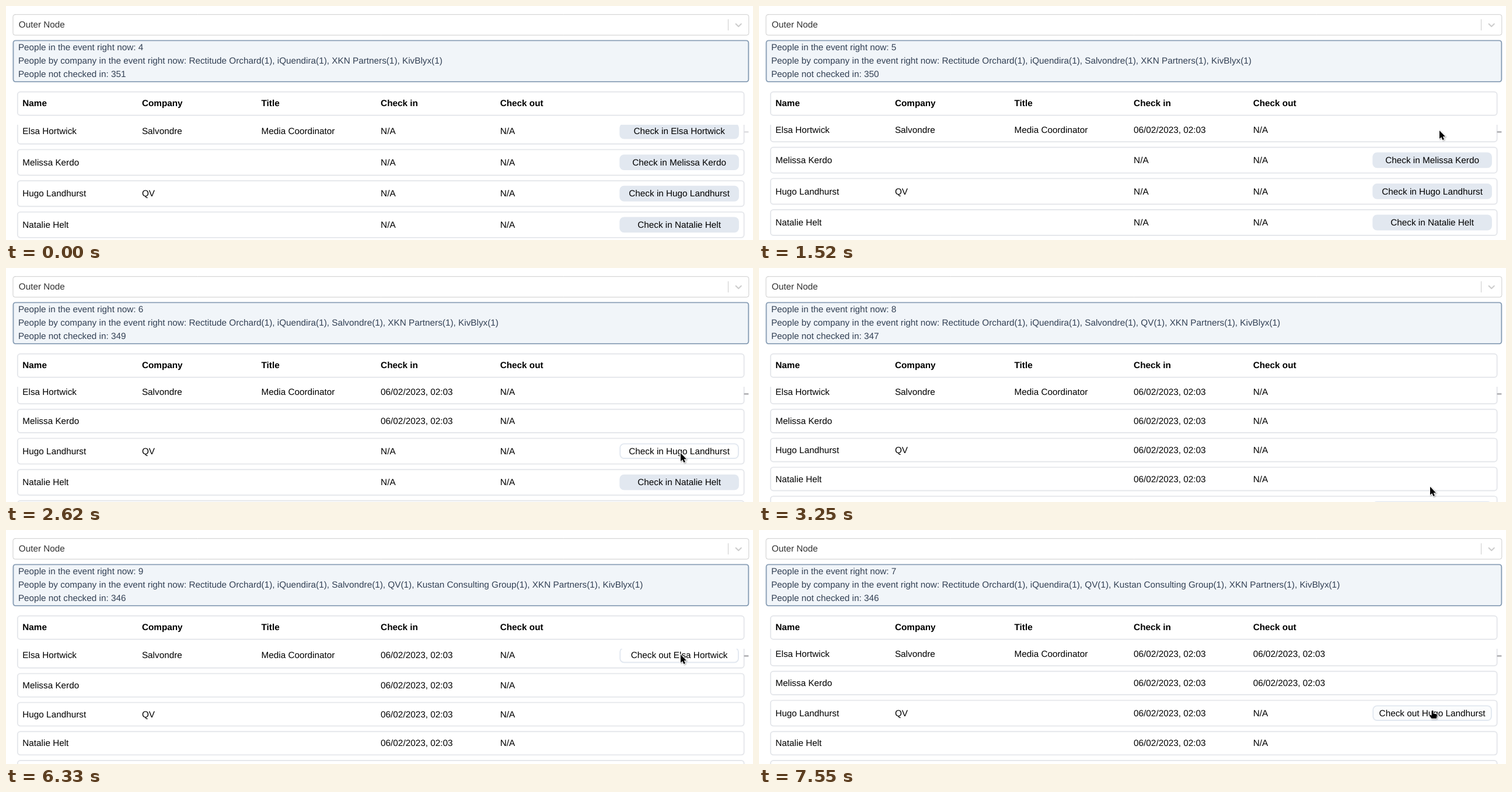
Write an HTML page with a canvas that moves like this. It is 1280 px wide and 402 px high and loops after 7650 ms.

```html
<!DOCTYPE html>
<html lang="en">
<head>
<meta charset="utf-8">
<title>Event check-in</title>
<style>
  html, body { margin: 0; width: 100%; height: 100%; overflow: hidden; background: #fff; }
  canvas { display: block; }
</style>
</head>
<body>
<canvas id="stage" width="1280" height="402"></canvas>
<script>
const ctx = document.getElementById('stage').getContext('2d');
const LOOP = 7650;
const S = 0.957;               // page zoom
const FACE = '"Liberation Sans", Arial, sans-serif';
const LEFT = 18.9, WIDTH = 1246.7, PAD = 9.4, COL = 204.6;
const LIST_TOP = 204, FIRST_ROW = 192.1;
const BTN_X = LEFT + PAD + 5 * COL, BTN_H = 28 * S;
const LAG = 160;               // ms between a click and its result
const MOVE = 300;              // ms for one pointer move
const NEVER = Infinity;

// enter: check-in, show: check-out button appears, leave: check-out (ms)
const people = [
  { name: 'Elsa Hortwick', company: 'Salvondre', title: 'Media Coordinator', enter: 1520, show: 5320, leave: 6480 },
  { name: 'Melissa Kerdo', company: '', title: '', enter: 2160, show: 6560, leave: 7240 },
  { name: 'Hugo Landhurst', company: 'QV', title: '', enter: 2650, show: 7290, leave: NEVER },
  { name: 'Natalie Helt', company: '', title: '', enter: 3200, show: NEVER, leave: NEVER },
  { name: 'Paula Venn', company: 'Kustan Consulting Group', title: '', enter: 3910, show: NEVER, leave: NEVER }
];

// the pointer sets off at a time towards a place and rests there
const trips = [
  { at: 330, x: 1150, y: 187 },
  { at: 520, x: 1175, y: 210 },
  { at: 900, x: 1168, y: 256 },
  { at: 1060, x: 1166, y: 214 },
  { at: people[0].enter, x: 1161, y: 270 },
  { at: people[1].enter, x: 1156, y: 318 },
  { at: people[2].enter, x: 1150, y: 373 },
  { at: people[3].enter, x: 1150, y: 410 },
  { at: 4250, x: 1143, y: 200 },
  { at: 5000, x: 1156, y: 214 },
  { at: people[0].leave, x: 1155, y: 268 },
  { at: people[1].leave, x: 1154, y: 310 }
];

const clamp = v => Math.max(0, Math.min(1, v));
const ease = k => k * k * (3 - 2 * k);
const mix = (a, b, k) => a + (b - a) * k;

function pointer(t) {
  if (t < trips[0].at) return null;
  let x = 1029, y = 359;
  trips.forEach((trip, i) => {
    const next = i + 1 < trips.length ? trips[i + 1].at : LOOP;
    const k = ease(clamp((t - trip.at) / Math.min(MOVE, next - trip.at)));
    x = mix(x, trip.x, k);
    y = mix(y, trip.y, k);
  });
  return { x, y };
}

function layout(t) {
  let y = FIRST_ROW;
  return people.map(p => {
    const label = t < p.enter ? 'Check in ' + p.name
      : t >= p.show && t < p.leave ? 'Check out ' + p.name : '';
    const h = (label ? 48 : 44) * S;
    const row = { p, label, y, h, mid: y + h / 2 };
    y += h + 8 * S;
    return row;
  });
}

function inList(t) {
  const c = pointer(t);
  return c !== null && c.y >= LIST_TOP;
}

function hovered(t) {
  if (!inList(t)) return -1;
  const c = pointer(t);
  if (c.x < BTN_X || c.x > BTN_X + COL) return -1;
  return layout(t).findIndex(r => r.label && Math.abs(c.y - r.mid) < BTN_H / 2);
}

// colour transition: share of the last 120 ms in which the test held
function share(t, test) {
  let n = 0;
  for (let k = 0; k < 8; k++) if (test(t - k * 15)) n++;
  return n / 8;
}

function text(str, x, mid, { color = '#000', bold = false, align = 'left' } = {}) {
  ctx.font = (bold ? 'bold ' : '') + 16 * S + 'px ' + FACE;
  ctx.fillStyle = color;
  ctx.textAlign = align;
  ctx.fillText(str, x, mid + 5.1);
}

// box with its border drawn inside the given edges
function box(x, y, w, h, r, line, stroke, fill) {
  ctx.beginPath();
  ctx.roundRect(x + line / 2, y + line / 2, w - line, h - line, r - line / 2);
  if (fill) { ctx.fillStyle = fill; ctx.fill(); }
  ctx.lineWidth = line;
  ctx.strokeStyle = stroke;
  ctx.stroke();
}

function drawSelect() {
  box(11.5, 14.2, 1261.8, 36.4, 4, 1, '#ccc', '#fff');
  text('Outer Node', 21.8, 32.2, { color: '#333' });
  ctx.fillStyle = '#ccc';
  ctx.fillRect(1237, 22.8, 1, 19.2);
  ctx.beginPath();
  ctx.moveTo(1250.6, 30.7);
  ctx.lineTo(1255.2, 35.2);
  ctx.lineTo(1259.8, 30.7);
  ctx.lineWidth = 2;
  ctx.lineCap = ctx.lineJoin = 'round';
  ctx.strokeStyle = '#ccc';
  ctx.stroke();
}

function drawSummary(t) {
  const inside = people.filter(p => t >= p.enter && t < p.leave);
  const waiting = 351 - people.filter(p => t >= p.enter).length;
  const firms = ['Rectitude Orchard', 'iQuendira',
    ...inside.map(p => p.company).filter(Boolean), 'XKN Partners', 'KivBlyx'];
  const lines = [
    'People in the event right now: ' + (4 + inside.length),
    'People by company in the event right now: ' + firms.map(f => f + '(1)').join(', '),
    'People not checked in: ' + waiting
  ];
  box(11.5, 58.4, 1261.8, 72.7, 5, 2 * S, '#8a9fb6', '#f1f5f9');
  lines.forEach((s, i) => text(s, 20.9, 71.3 + i * 24 * S, { color: '#334155' }));
}

function drawCells(cells, mid, bold) {
  cells.forEach((s, i) => text(s, LEFT + PAD + i * COL, mid, { bold }));
}

function drawButton(label, mid, lit) {
  const fill = `rgb(${mix(226, 255, lit)},${mix(232, 255, lit)},${mix(240, 255, lit)})`;
  box(BTN_X, mid - BTN_H / 2, COL, BTN_H, 8 * S, 2 * S, '#e2e8f0', fill);
  text(label, BTN_X + COL / 2, mid, { align: 'center' });
}

function drawList(t) {
  ctx.save();
  ctx.beginPath();
  ctx.rect(0, LIST_TOP, 1280, 402 - LIST_TOP);
  ctx.clip();
  const stamp = since => t >= since ? '06/02/2023, 02:03' : 'N/A';
  layout(t).forEach(({ p, label, y, h, mid }, i) => {
    box(LEFT, y, WIDTH, h, 6 * S, 2 * S, '#e5e7eb');
    drawCells([p.name, p.company, p.title, stamp(p.enter), stamp(p.leave)], mid);
    if (label) drawButton(label, mid, share(t, u => hovered(u) === i));
  });
  ctx.restore();

  // scrollbar thumb, darker soon after the pointer enters the list
  const g = mix(222, 176, share(t - 120, inList));
  ctx.fillStyle = `rgb(${g},${g},${g + 3})`;
  ctx.fillRect(1264.6, 215.1, 7.8, 2.6);
}

const arrow = new Path2D('M0 0V14L3.2 11.2L5.5 16.2L7.9 15.1L5.7 10.3H10Z');
const hand = new Path2D('M-1.4 1Q0 -1 1.4 1V5.2L6.3 6.3Q8 6.8 7.8 8.6L6.9 13.8H-1.6L-5 9Q-4.7 7 -2.9 7.8L-1.4 9Z');

function drawPointer(t) {
  const c = pointer(t);
  if (!c) return;
  const pending = at => t < at && t >= at - LAG;
  const busy = people.some(p => pending(p.enter) || pending(p.leave));
  const shape = hovered(t) >= 0 && !busy ? hand : arrow;
  ctx.save();
  ctx.translate(c.x, c.y);
  ctx.lineJoin = 'round';
  ctx.lineWidth = 1.8;
  ctx.strokeStyle = '#fff';
  ctx.shadowColor = 'rgba(0,0,0,.35)';
  ctx.shadowBlur = 2;
  ctx.shadowOffsetX = ctx.shadowOffsetY = 1;
  ctx.stroke(shape);
  ctx.shadowColor = 'transparent';
  ctx.fillStyle = '#000';
  ctx.fill(shape);
  ctx.restore();
}

function draw(t) {
  ctx.fillStyle = '#fff';
  ctx.fillRect(0, 0, 1280, 402);
  ctx.textRendering = 'geometricPrecision';
  drawSelect();
  drawSummary(t);
  box(LEFT, 146.6, WIDTH, 44 * S, 6 * S, 2 * S, '#e5e7eb');
  drawCells(['Name', 'Company', 'Title', 'Check in', 'Check out'], 167.2, true);
  drawList(t);
  drawPointer(t);
}

const start = performance.now();
function tick() {
  draw((performance.now() - start) % LOOP);
  requestAnimationFrame(tick);
}
tick();
</script>
</body>
</html>
```
